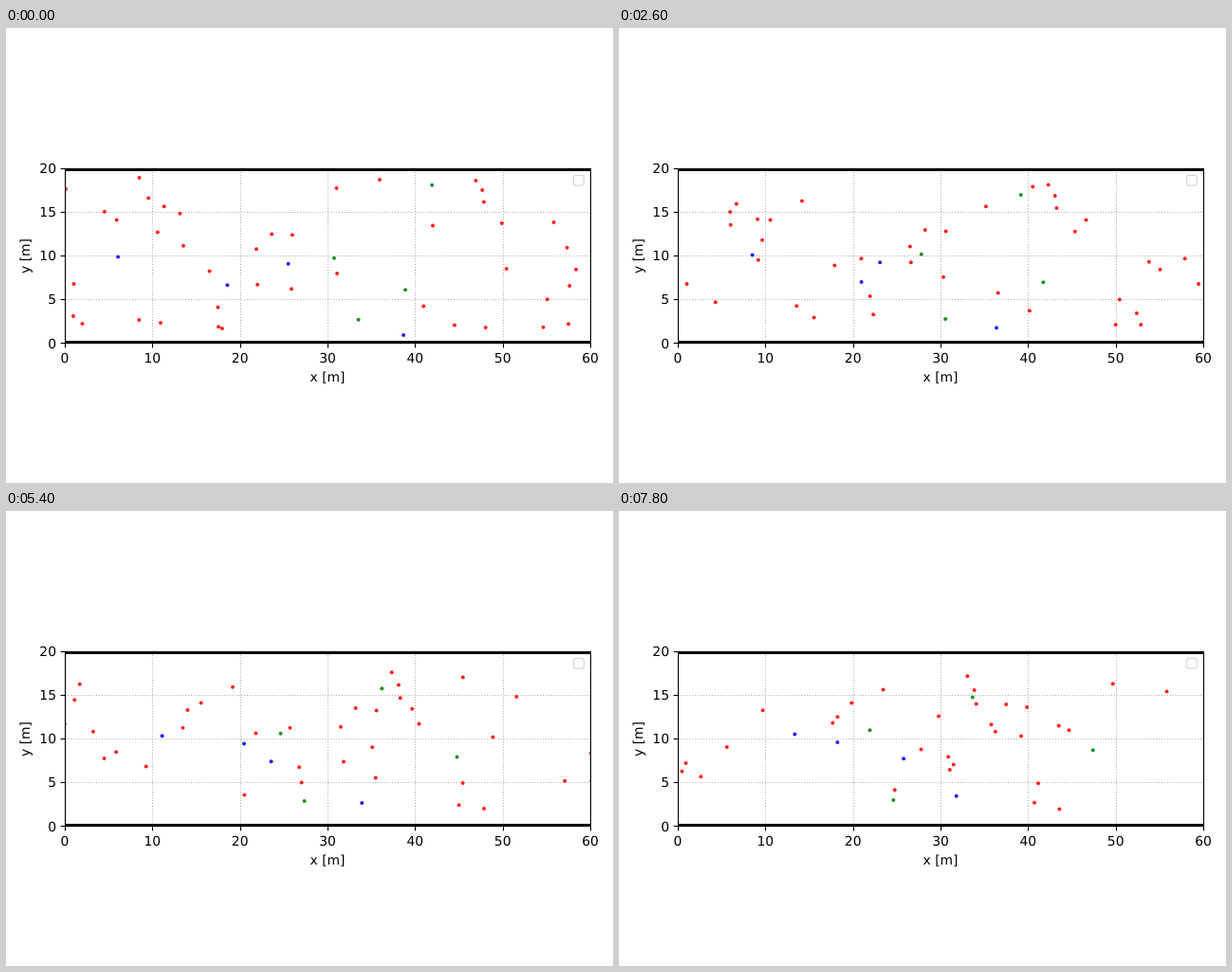
These frames come from a looping animation (640x480 px, 8 s). An HTML page:

```html
<!DOCTYPE html>
<html lang="en">
<head>
<meta charset="utf-8">
<title>Walkers in a corridor</title>
<style>
html, body { margin: 0; width: 100%; height: 100%; overflow: hidden; background: #fff; }
svg { display: block; width: 640px; height: 480px; }
text { font: 13.89px "DejaVu Sans", sans-serif; text-rendering: geometricPrecision; }
</style>
</head>
<body>
<svg id="stage" viewBox="0 0 640 480">
  <clipPath id="area"><rect x="62" y="148" width="554.5" height="185"/></clipPath>
  <g id="grid" stroke="#b0b0b0" stroke-width="1.1111" stroke-dasharray="1.1111 1.8333"></g>
  <g id="dots" clip-path="url(#area)" fill-opacity=".88"></g>
  <path d="M62 149.5H616.5M62 331.5H616.5" stroke="#000" stroke-width="3"/>
  <rect x="62.5" y="148.5" width="554" height="184" fill="none" stroke="#000" stroke-width="1.1"/>
  <rect x="598.5" y="155.3" width="10.8" height="10.8" rx="2.4" fill="#fff" stroke="#ccc" stroke-opacity=".8" stroke-width="1.2"/>
  <g id="axes" stroke-width="1.1"></g>
  <text x="339" y="373" text-anchor="middle">x [m]</text>
  <text transform="translate(25 240.5) rotate(-90)" text-anchor="middle">y [m]</text>
</svg>
<script>
const STEP = 200, LOOP = 8000, HALF = 20;
const METRE = 554 / 60, LEFT = 62, FLOOR = 332.33;
const $ = id => document.getElementById(id);

function add(parent, tag, attrs, text) {
  const el = document.createElementNS('http://www.w3.org/2000/svg', tag);
  for (const k in attrs) el.setAttribute(k, attrs[k]);
  if (text !== undefined) el.textContent = text;
  return parent.appendChild(el);
}

// Each crowd keeps one pace (px per step); a walker is its place at half time
// and its heading in degrees, clockwise from the right
const crowds = [
  { color: '#f00', pace: 3.3, walkers: [
    [459, 171.4, 10], [515.4, 199.3, -8], [407.6, 198.5, 26.5], [367.6, 212.5, -5],
    [345.8, 210.5, -6], [329.9, 229.2, -3.5], [364.1, 255.9, -17], [277.4, 236, -18],
    [286.9, 276.6, -16], [289.9, 294.4, -20], [228.5, 302.4, -7.4], [216, 184.1, 4],
    [168.8, 205.9, 10.5], [182.6, 202.4, 0], [567.5, 292.8, -20.5], [593.7, 255.2, 1],
    [607, 264, 63.5], [621.5, 290.5, 63], [633, 325.5, 54],
    [536.1, 242.6, 190.5], [458.2, 219.6, 168], [438.6, 193.7, 171], [436.8, 180.2, 172],
    [429.7, 167.8, 174], [285.6, 240.9, 196], [377.8, 271.9, 199], [411.3, 289.9, 201],
    [167.5, 281.3, 211], [104.6, 213.4, 123], [100.8, 184.2, 183.5], [95, 203.5, 190.5],
    [133.6, 239, 139], [125.2, 252.8, 159.5], [66.7, 247.4, 258], [81, 279, 206],
    [206.9, 239.7, 208], [504.7, 286.8, 179.5], [500.6, 311.7, 183.5], [527.1, 313.5, 179],
    [-3, 170, 180], [5.5, 270, 180], [5, 304, 180]
  ] },
  { color: '#00f', pace: 1.73, walkers: [
    [152.6, 238.4, -5], [267.6, 266.1, -8.5], [263.1, 246.4, 184], [386.6, 312.1, 200]
  ] },
  { color: '#008000', pace: 2.11, walkers: [
    [410, 181.6, 158], [304.2, 236.8, 188], [329.4, 306.4, 182], [461.4, 263.9, -17]
  ] }
];

const dots = crowds.flatMap(({ color, pace, walkers }) =>
  walkers.map(([x, y, heading]) => {
    const a = heading * Math.PI / 180;
    const el = add($('dots'), 'circle', { r: 2, fill: color });
    return { el, x, y, vx: pace * Math.cos(a), vy: pace * Math.sin(a) };
  }));

// Lines sit on pixel centres
const snap = v => Math.round(v) + .5;

for (let m = 0; m <= 60; m += 10) {
  const x = LEFT + m * METRE;
  if (m % 60) add($('grid'), 'path', { d: `M${snap(x)} 332.5V148` });
  add($('axes'), 'path', { d: `M${snap(x)} 332.5v4.9`, stroke: '#000' });
  add($('axes'), 'text', { x, y: 353, 'text-anchor': 'middle' }, m);
}
for (let m = 0; m <= 20; m += 5) {
  const y = FLOOR - m * METRE;
  if (m % 20) add($('grid'), 'path', { d: `M62.5 ${snap(y)}H616` });
  add($('axes'), 'path', { d: `M62.5 ${snap(y)}h-4.9`, stroke: '#000' });
  add($('axes'), 'text', { x: 53, y: Math.round(y + 5.25), 'text-anchor': 'end' }, m);
}

function render(ms) {
  const n = Math.floor(ms % LOOP / STEP) - HALF;
  for (const { el, x, y, vx, vy } of dots) {
    el.setAttribute('cx', x + vx * n);
    el.setAttribute('cy', y + vy * n);
  }
}

const start = performance.now();
function tick() {
  render(performance.now() - start);
  requestAnimationFrame(tick);
}
tick();
</script>
</body>
</html>
```
